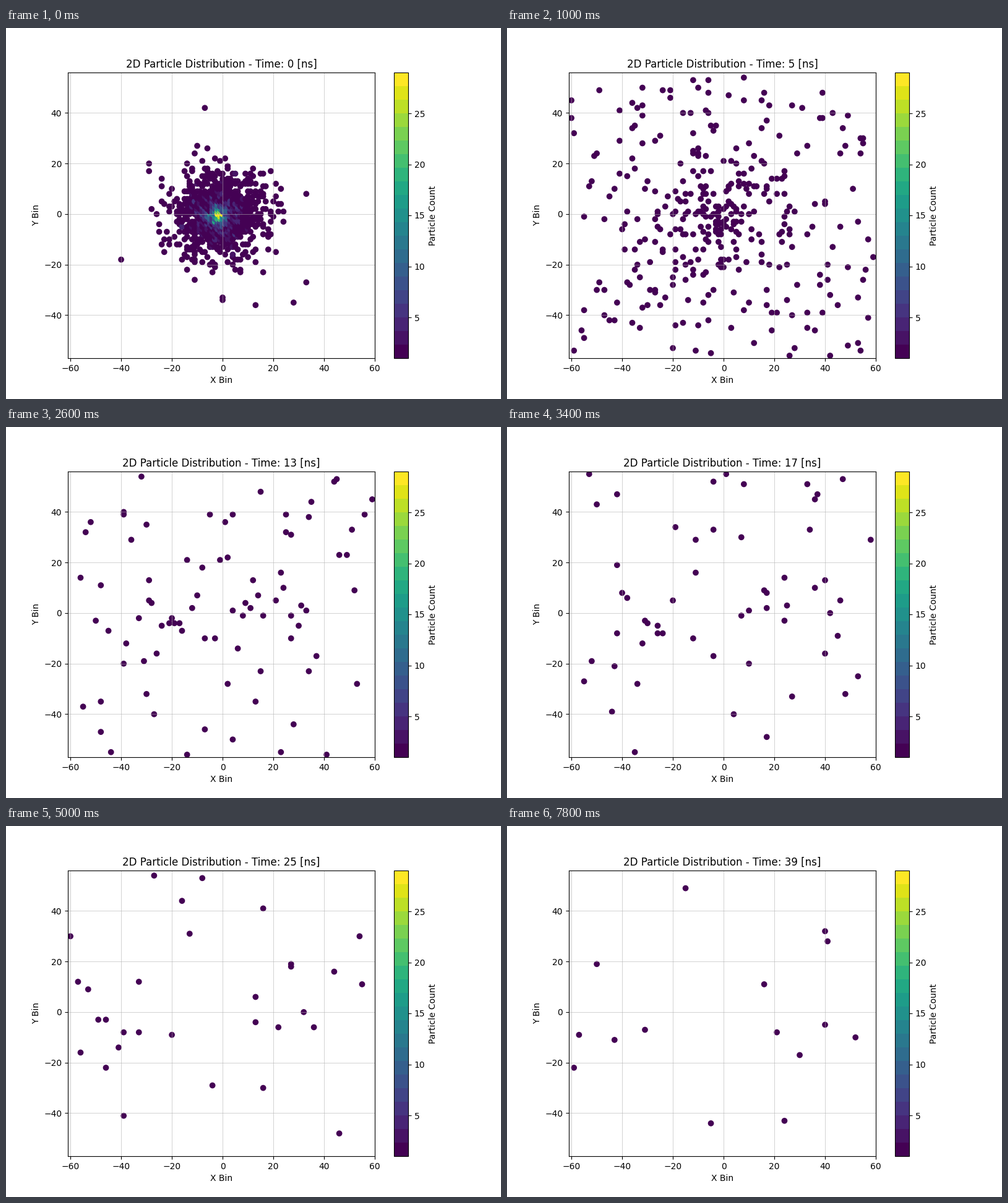
A matplotlib script that plays this animation: 800x600 px, repeating every 8000 ms.

```python
import numpy as np
import matplotlib.pyplot as plt
from matplotlib.animation import FuncAnimation

FRAMES, INTERVAL = 40, 200
COUNT = 1740
EDGE = np.array([61, 57])

# Farthest stragglers around the dense cloud at the start
STRAYS = [(-7, 42), (-29, 20), (-29, 17), (33, 8), (-40, -18),
          (33, -27), (28, -35), (13, -36), (0, -33), (0, -34)]

rng = np.random.default_rng(12)


def cloud(n):
    """Cloud whose density falls off roughly as 1/r."""
    r = np.abs(8.5 * rng.standard_t(8, 2 * n))
    r = r[r < 29][:n]
    a = rng.uniform(0, 2 * np.pi, n)
    ring = np.column_stack([r * np.cos(a), r * np.sin(a)])
    return ring + rng.normal(0, 0.9, (n, 2)) + (-0.5, 0)


def to_edge(d):
    """Point where the ray along d leaves the box."""
    return d / np.max(np.abs(d) / EDGE, axis=1, keepdims=True)


start = cloud(COUNT)
start[:len(STRAYS)] = STRAYS
rim = to_edge(rng.uniform(-EDGE, EDGE, (COUNT, 2)))

# The number left in view falls as 4025 / t**1.5
rank = rng.permutation(np.arange(1, COUNT + 1))
leave = (4025 / rank[:, None]) ** (2 / 3)


def bins_at(t):
    # Crowded towards the middle at first, evenly spread later on
    power = 0.75 + 2 * np.exp(-t / 8)
    s = (t / leave) ** power
    cells = np.floor(start + (rim - start) * s)
    seen = np.all((cells > -EDGE) & (cells < EDGE - 1), axis=1)
    return np.unique(cells[seen], axis=0, return_counts=True)


fig, ax = plt.subplots(figsize=(8, 6), dpi=100)
dots = ax.scatter([], [], c=[], cmap=plt.get_cmap("viridis", 21),
                  vmin=1, vmax=29)
fig.colorbar(dots, ax=ax, label="Particle Count")
ax.set(xlim=(-61, 60), ylim=(-57, 56), xlabel="X Bin", ylabel="Y Bin")
ax.grid(True, linewidth=0.5, alpha=0.8)
title = ax.set_title("")


def draw(t):
    cells, counts = bins_at(t)
    dots.set_offsets(cells)
    dots.set_array(counts)
    title.set_text(f"2D Particle Distribution - Time: {t} [ns]")
    return dots, title


anim = FuncAnimation(fig, draw, frames=FRAMES, interval=INTERVAL,
                     repeat=True, repeat_delay=0)
plt.show()
```
